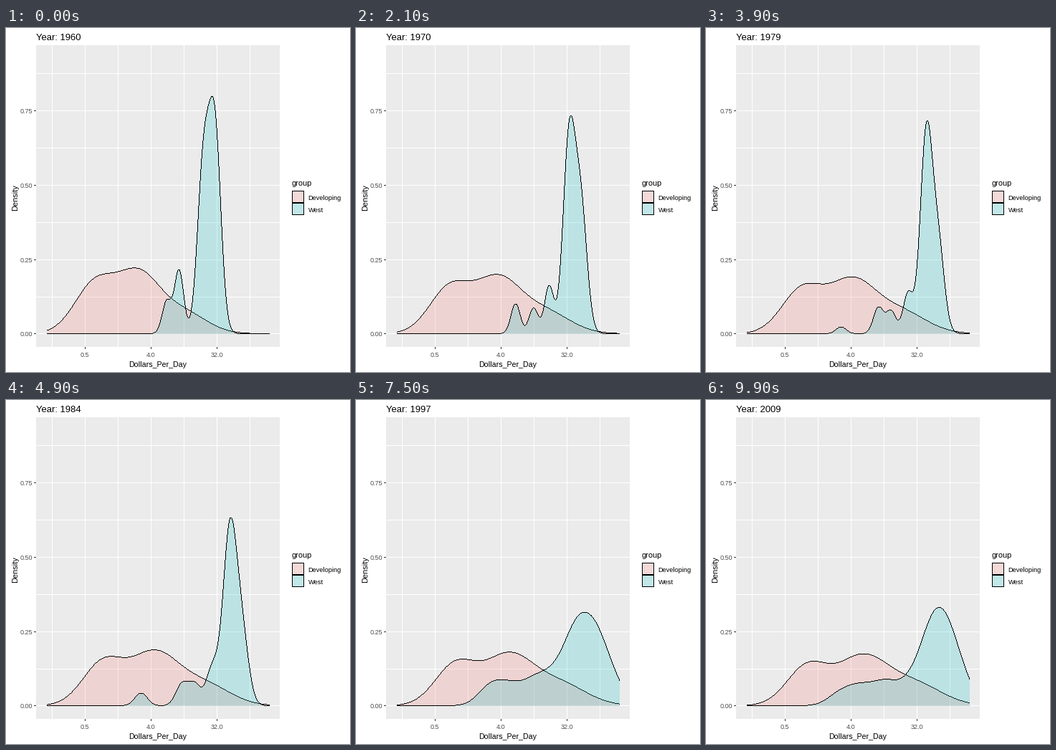
Write a matplotlib script that moves like this. It is 480 px wide and 480 px high and loops after 10 s.

```python
import numpy as np
import matplotlib.pyplot as plt
from matplotlib.animation import FuncAnimation
from matplotlib.patches import Rectangle

SIZE, DPI, FRAMES = 480, 72, 100
BASE = 426.5
PINK, TEAL = "#F8766D", "#00BFC4"

plt.rcParams["font.family"] = "Liberation Sans"
edges = np.arange(57, 369)


def lerp(a, b, t):
    return a + (b - a) * t


def ramp(i, start, end):
    return np.clip((i - start) / (end - start), 0, 1)


def mix(*bumps):
    """Sum of bell curves given as (centre, width, height)."""
    x = edges - 0.5
    return sum(h * np.exp(-0.5 * ((x - mu) / sd) ** 2) for mu, sd, h in bumps)


def developing(t):
    return mix((lerp(124, 141, t), 28.5, lerp(69, 54, t)),
               (lerp(184, 217, t), lerp(29, 35, t), lerp(78, 66, t)),
               (lerp(245, 290, t), lerp(33, 38, t), 30))


def west(i, t):
    narrow = 6.4 + 11 * ramp(i, 29, 75) ** 2
    wide = np.interp(i, [0, 14, 29, 49, 60, 75], [8.4, 9.5, 7.4, 9.5, 12.5, 24])
    # The main mass shrinks smoothly; its right half fades into the left one
    mass = 4260 - 1500 * t * t * (3 - 2 * t)
    right = 278 * (1 - t)
    passing = 34 * np.exp(-((i - 29) / 8) ** 2)
    return mix((lerp(275, 331, t), wide, mass / wide - right),
               (lerp(291, 348, t), wide, right),
               (lerp(241, 312, t), narrow, lerp(88, 32, t)),
               (lerp(224, 283, t), narrow, lerp(45, 21, t)),
               (250 - 125 * (1 - t) ** 3, narrow, 29 * ramp(i, 0, 14) + passing),
               (188, narrow, 27 * np.sin(np.pi * ramp(i, 29, 119))),
               (217, narrow, 23 * ramp(i, 49, 75)))


fig = plt.figure(figsize=(SIZE / DPI, SIZE / DPI), dpi=DPI, facecolor="white")
ax = fig.add_axes([0, 0, 1, 1])
ax.set(xlim=(0, SIZE), ylim=(SIZE, 0))
ax.axis("off")


def rect(x, y, w, h, color, alpha=1):
    ax.add_patch(Rectangle((x, y), w, h, fc=color, alpha=alpha, lw=0))


def label(x, y, s, size, color="black", **kw):
    return ax.text(x, y, s, size=size, color=color, va="baseline", **kw)


rect(42, 24, 340, 421, "#EBEBEB")
for x in range(64, 341, 46):
    rect(x, 24, 1, 421, "white")
for k in range(8):
    rect(42, round(426.4 - 51.85 * k), 340, 1, "white")

for k, s in enumerate(("0.5", "4.0", "32.0")):
    x = 110 + 92 * k
    rect(x, 445, 1, 3, "#333333")
    label(x, 459, s, 9, "#4D4D4D", ha="center")
for k in range(4):
    y = round(426.4 - 103.7 * k)
    rect(39, y, 3, 1, "#333333")
    label(37, y + 4, f"{k / 4:.2f}", 9, "#4D4D4D", ha="right")

label(212, 473, "Dollars_Per_Day", 10.6, ha="center")
ax.text(16, 236.5, "Density", size=11, rotation=90, ha="center",
        va="baseline", rotation_mode="anchor")

label(398.5, 220, "group", 11)
for y, s, c in ((227, "Developing", PINK), (244, "West", TEAL)):
    rect(399, y, 17, 17, "black")
    rect(400, y + 1, 15, 15, "#F2F2F2")
    rect(400, y + 1, 15, 15, c, alpha=0.2)
    label(421.5, y + 13, s, 9.3)

title = label(42, 17, "", 13)
layers = []
for z, c in ((3, PINK), (5, TEAL)):
    flat = np.full(len(edges) - 1, BASE)
    layers.append((
        ax.stairs(flat, edges, fill=True, color=c, alpha=0.2, zorder=z),
        ax.stairs(flat, edges, fill=True, color="black", zorder=z + 1)))
ax.set(xlim=(0, SIZE), ylim=(SIZE, 0))


def draw(i):
    u = i / (FRAMES - 1)
    t = u ** 0.6
    title.set_text(f"Year: {round(1960 + 49 * u)}")
    for height, (fill, outline) in zip((developing(t), west(i, t)), layers):
        # One crisp pixel of outline per column, taller where it is steep
        row = np.floor(BASE - height)
        top = np.minimum(row[:-1], row[1:])
        bottom = np.maximum(np.maximum(row[:-1], row[1:]), top + 1)
        fill.set_data(top, edges, BASE + 0.5)
        outline.set_data(top, edges, bottom)
    return [title, *(patch for pair in layers for patch in pair)]


anim = FuncAnimation(fig, draw, frames=FRAMES, interval=100, repeat=True,
                     repeat_delay=0)
plt.show()
```
